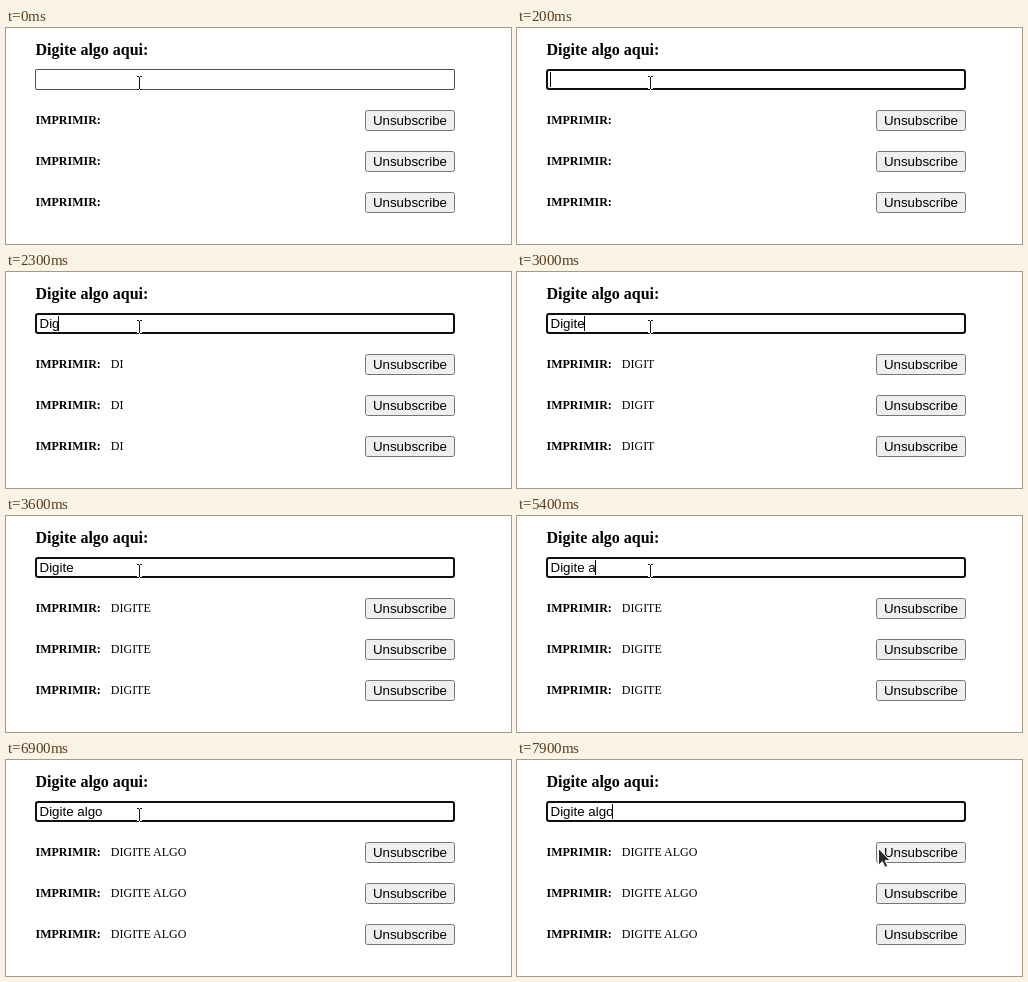
Write an HTML page that moves like this. It is 505 px wide and 216 px high and loops after 8000 ms.

```html
<!DOCTYPE html>
<html lang="pt">
<head>
<meta charset="utf-8">
<title>Digite algo</title>
<style>
  html, body { margin: 0; width: 100%; height: 100%; overflow: hidden; background: #fff; }
  #stage { position: relative; width: 505px; height: 216px; overflow: hidden; color: #000; pointer-events: none; }
  #stage * { position: absolute; box-sizing: border-box; white-space: pre; }
  h1, b, .out { margin: 0; font-family: "Liberation Serif", "Times New Roman", serif; }
  h1 { left: 29.5px; top: 11px; font-size: 16px; line-height: 21px; }
  b, .out { font-size: 12px; line-height: 20px; }
  b { left: 29.5px; }
  .out { left: 104.8px; }
  #field { left: 29px; top: 41px; width: 420px; height: 21px; border: 1px solid #4f4f4f; border-radius: 2px; }
  #field.focus { border: 2px solid #101010; border-radius: 3px; }
  #typed, button { font: 13.3333px "Liberation Sans", Arial, sans-serif; }
  #typed { left: 33.5px; top: 44px; line-height: 15px; }
  #caret { top: 44px; width: 1px; height: 15px; background: #000; }
  button { right: 56px; margin: 0; }
  svg { overflow: visible; }
  #beam { left: 130px; top: 47px; }
</style>
</head>
<body>
<div id="stage">
  <h1>Digite algo aqui:</h1>
  <div id="field"></div>
  <span id="typed"></span>
  <div id="caret"></div>
  <div id="rows"></div>
  <svg id="beam" width="8" height="17" fill="none">
    <path d="M1 1.5H6M3.5 1.5V14.5M1 14.5H6" stroke="#fff" stroke-width="3"/>
    <path d="M1 1.5H3M4 1.5H6M3.5 2V14M1 14.5H3M4 14.5H6" stroke="#111"/>
  </svg>
  <svg id="arrow" width="14" height="22">
    <path d="M.5 .5V17.2L4.4 13.6L7 19.4L9.7 18.2L7.2 12.6H12.2Z" fill="#2a2a2a" stroke="#fff" stroke-linejoin="round"/>
  </svg>
</div>
<script>
const LOOP = 8000, TICK = 100;
const FOCUS = 150, BLINK = 620, LAG = 80, MOVE = 7700;
const TEXT = "Digite algo";
// One press time per letter
const PRESSES = [1510, 1950, 2250, 2350, 2910, 2935, 5050, 5350, 5490, 6150, 6250];

const $ = id => document.getElementById(id);
const show = (el, on) => { el.style.visibility = on ? "visible" : "hidden"; };
const lettersAt = t => TEXT.slice(0, PRESSES.filter(p => p <= t).length);
const lerp = (a, b, k) => a + (b - a) * k;

for (let i = 0; i < 3; i++) {
  const y = 82 + 41 * i;
  $("rows").insertAdjacentHTML("beforebegin", `
    <b style="top:${y}px">IMPRIMIR:</b>
    <span class="out" style="top:${y}px"></span>
    <button type="button" tabindex="-1" style="top:${y}px">Unsubscribe</button>`);
}
const outs = document.querySelectorAll(".out");

const pen = document.createElement("canvas").getContext("2d");
pen.font = '13.3333px "Liberation Sans", Arial, sans-serif';

function draw(t) {
  const value = lettersAt(t);
  const focused = t >= FOCUS;
  $("field").classList.toggle("focus", focused);
  $("typed").textContent = value;
  outs.forEach(o => { o.textContent = lettersAt(t - LAG).toUpperCase(); });

  // Each press restarts the blink
  const since = t - (value ? PRESSES[value.length - 1] : FOCUS);
  $("caret").style.left = Math.floor(33 + pen.measureText(value).width) + "px";
  show($("caret"), focused && Math.floor(since / BLINK) % 2 === 0);

  const k = Math.min(1, (t - MOVE) / 200);
  show($("beam"), k <= 0);
  show($("arrow"), k > 0);
  $("arrow").style.left = lerp(133, 360.5, k) + "px";
  $("arrow").style.top = lerp(50, 88, k) + "px";
}

const start = performance.now();
function frame() {
  const t = (performance.now() - start) % LOOP;
  draw(Math.floor(t / TICK) * TICK);
  requestAnimationFrame(frame);
}
frame();
</script>
</body>
</html>
```
